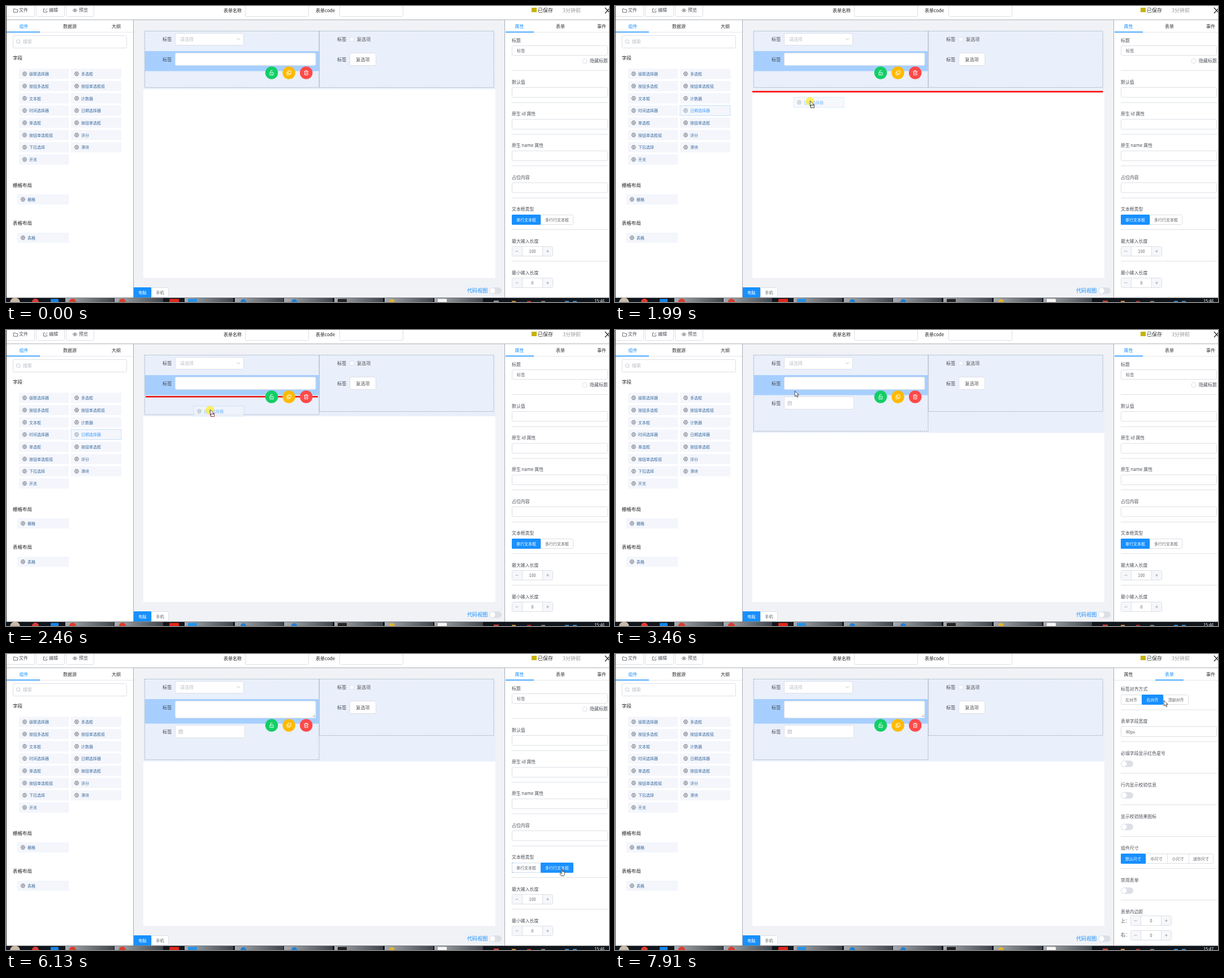
These frames come from a looping animation (1067x525 px, 7.99 s). An HTML page:

```html
<!DOCTYPE html>
<html lang="zh-CN">
<head>
<meta charset="utf-8">
<title>表单设计器</title>
<style>
html, body { margin: 0; width: 100%; height: 100%; overflow: hidden; background: #fff; }
svg { display: block; width: 1067px; height: 525px; }
text { font-family: "Noto Sans CJK SC", "Noto Sans", sans-serif; white-space: pre; }
</style>
</head>
<body>
<svg id="stage" viewBox="0 0 1067 525" xmlns="http://www.w3.org/2000/svg"></svg>
<script>
const LOOP = 7990;
const BLUE = '#1890ff', EDGE = '#dcdfe6', INK = '#4c5058', SOFT = '#e9effb';

// Drawing helpers: every one returns SVG markup.
const rect = (x, y, w, h, fill, extra = '') =>
  `<rect x="${x}" y="${y}" width="${w}" height="${h}" fill="${fill}" ${extra}/>`;
const box = (x1, y1, x2, y2, fill = '#fff', stroke = EDGE, extra = '') =>
  rect(x1 + .5, y1 + .5, x2 - x1 - 1, y2 - y1 - 1, fill, `stroke="${stroke}" rx="2" ${extra}`);
const text = (x, cy, s, size = 7.9, fill = INK, extra = '') =>
  `<text x="${x}" y="${cy + size * .37}" font-size="${size}" fill="${fill}" ${extra}>${s}</text>`;
const mid = (x, cy, s, size, fill, extra = '') => text(x, cy, s, size, fill, 'text-anchor="middle" ' + extra);
const line = (d, stroke, w = 1, extra = '') =>
  `<path d="${d}" fill="none" stroke="${stroke}" stroke-width="${w}" ${extra}/>`;
const circle = (x, y, r, fill, extra = '') => `<circle cx="${x}" cy="${y}" r="${r}" fill="${fill}" ${extra}/>`;
const group = (id, body, extra = '') => `<g id="${id}" ${extra}>${body}</g>`;
const BOLD = 'font-weight="500"';

const hexIcon = (x, y, c = '#59606b') =>
  line(`M${x - 3.6} ${y}l1.8 -3.2h3.6l1.8 3.2l-1.8 3.2h-3.6z`, c, .9) + circle(x, y, 1.4, 'none', `stroke="${c}" stroke-width=".8"`);

const item = (x, cy, w, s, ink = '#3b6c9f', extra = '') =>
  rect(x, cy - 9, w, 18, '#f4f6fc', extra) + hexIcon(x + 10, cy, extra ? '#7c8da5' : undefined) + text(x + 18, cy + .3, s, 7, ink);

const hotItem = (x, cy) => item(x, cy, 89, '日期选择器', '#409eff', 'stroke="#9ccdf5" stroke-width=".8" stroke-dasharray="2 1"');

const divider = y => line(`M895 ${y}H1065`, '#dfe1e5');

function segments(edges, labels, active, y) {
  const h = 18, last = edges[edges.length - 1];
  return box(edges[0], y, last, y + h) + labels.map((s, i) => {
    const x = edges[i], w = edges[i + 1] - x, on = i === active;
    return (on ? rect(x, y, w, h, BLUE, 'rx="1.5"') : i ? line(`M${x + .5} ${y}v${h}`, EDGE) : '') +
      mid(x + w / 2, y + h / 2 + .2, s, 7, on ? '#fff' : '#606266');
  }).join('');
}

const stepper = (x, y, value) => box(x, y, x + 73, y + 18) +
  rect(x + 1, y + 1, 17, 16, '#f5f7fa') + rect(x + 55, y + 1, 17, 16, '#f5f7fa') +
  line(`M${x + 18.5} ${y}v18M${x + 54.5} ${y}v18`, EDGE) +
  line(`M${x + 6.5} ${y + 9}h5M${x + 61} ${y + 9}h5M${x + 63.5} ${y + 6.5}v5`, '#8c9099', .7) +
  mid(x + 36.5, y + 9, value, 7.2, '#606266');

const toggle = (x, cy) => rect(x, cy - 5.7, 22, 11.4, EDGE, 'rx="5.7"') + circle(x + 5.8, cy, 4.7, '#fff');

function topBar() {
  const button = (x1, x2, s) => box(x1, -6, x2, 19) + text(x1 + 23, 7.5, s, 8, INK);
  return rect(0, 0, 1067, 24, '#fff') +
    button(0, 51, '文件') + button(53, 104, '编辑') + button(106, 156, '预览') +
    line('M13.5 5h2.5l1 1.2h3.5v5h-7z', INK, .8) +
    line('M69 5h-2.5v6h6V8.5M69.500 8.500l3.500 -4', INK, .8) +
    line('M118 7.700q4 -5.200 8 0q-4 5.200 -8 0z', INK, .8) + circle(122, 7.7, 1.2, INK) +
    text(385, 7.8, '表单名称', 8, '#222', BOLD) + box(423, -6, 536, 19) +
    text(548, 7.8, '表单code', 8, '#222', BOLD) + box(590, -6, 703, 19) +
    rect(930, 3, 9, 8, '#c6b30b') + text(941, 7.5, '已保存', 9, '#333', BOLD) +
    text(985, 7.5, '3分钟前', 9, '#999') +
    line('M1060 3l9 10M1060 13l9 -10', '#222', 1.2) + line('M0 24.5H1067', '#aeb2ba');
}

function leftPanel() {
  const columns = [
    ['级联选择器', '按钮多选框', '文本框', '时间选择器', '单选框', '按钮单选框组', '下拉选择', '开关'],
    ['多选框', '按钮单选框组', '计数器', '日期选择器', '按钮单选框', '评分', '滑块']];
  const heading = (cy, s) => text(12, cy, s, 8.5, '#222', BOLD);
  return rect(0, 25, 225, 493, '#fff') + line('M225.5 25V518', '#a9adb5') +
    mid(31.5, 36, '组件', 8, BLUE) + mid(113, 36, '数据源', 8, '#333') + mid(195, 36, '大纲', 8, '#333') +
    line('M0 46.500H225', '#e4e7ed') + rect(1, 45.5, 59, 1.5, BLUE) +
    box(12, 52, 214, 75) + circle(21.5, 63, 3.2, 'none', 'stroke="#b8bcc4" stroke-width=".8"') +
    line('M24 65.500l2 2', '#b8bcc4', .8) + text(30, 63.5, '搜索', 8, '#b8bcc4') +
    heading(92, '字段') +
    columns.map((names, c) => names.map((s, i) => item(c ? 115 : 23, 120.3 + 21.7 * i, c ? 89 : 88, s)).join('')).join('') +
    heading(317.5, '栅格布局') + item(20, 343, 91, '栅格') +
    heading(385, '表格布局') + item(20, 411, 91, '表格');
}

function canvasArea() {
  const dash = 'fill="none" stroke="#9aa7b8" stroke-width=".9" stroke-dasharray="2 1.4"';
  const label = (x, cy) => text(x, cy, '标签', 8.2, '#44484f');
  const tool = (x, fill, icon) => circle(x, 118.5, 11.2, fill) + `<g transform="translate(${x} 118.5)">${line(icon, '#fff', .9)}</g>`;
  return rect(226, 25, 656, 493, '#f0f2f6') + rect(243, 146, 623, 336.5, '#fff') +
    rect(243, 44, 623, 103, SOFT, 'id="row"') +
    rect(246, 80, 307.5, 35.5, '#a6cfff', 'id="selected"') +
    rect(245.5, 44.5, 308.5, 100, 'none', 'id="cell" ' + dash) + rect(554.5, 44.5, 308.5, 100, 'none', dash) +
    label(277, 59) + box(299, 48, 421, 70) + text(308, 59.3, '请选择', 8, '#bcc0c8') + line('M408.500 57.500l2.700 2.700l2.700 -2.700', '#b4b8c0', .9) +
    label(277, 94.5) + rect(299.5, 83.5, 248.5, 22, '#fff', 'id="input" rx="2" stroke="#dcdfe6"') +
    rect(308, 89.5, 1, 10, '#333', 'id="caret"') +
    group('grip', line('M542.500 112l4.500 -4.500M545 112l2 -2', '#888', .8)) +
    label(586, 59) + box(608, 55, 616, 63) + text(621, 59, '复选项', 8.1, '#555') +
    label(586, 94.5) + box(608, 83, 655, 106) + mid(631.5, 94.8, '复选项', 8.1, '#555') +
    group('date', label(277, 130) + box(299, 118, 423, 141) +
      line('M306 127h6.500v6h-6.500zM306 129h6.500M308 126v1.500M310.500 126v1.500M307.500 131h3.500', '#b4b8c0', .8)) +
    rect(247, 117, 305, 2.6, '#e81515', 'id="cellDrop"') + rect(243, 150.6, 620.5, 2.7, '#fb0808', 'id="pageDrop"') +
    group('tools',
      tool(470, '#13ce66', 'M-3 -.5h6v4.500h-6zM-1.800 -.5v-2a1.800 1.800 0 0 1 3.500 -.6M0 1v1.500') +
      tool(500.6, '#ffba00', 'M-1.500 -3.500h5v5h-5zM-1.500 -1.500h-2v5h5v-2') +
      tool(531.2, '#ff4949', 'M-4 -2.500h8M-1.300 -2.500v-1.400h2.600v1.400M-2.800 -2.500v6.300h5.600v-6.300M-.9 -.5v2.500M.9 -.5v2.500')) +
    rect(226, 499, 31, 18, BLUE) + mid(241.5, 508, '电脑', 7.2, '#fff') +
    box(257, 499, 288, 517) + mid(272.5, 508, '手机', 7.2, '#606266') +
    text(816, 504.5, '代码视图', 9.1, BLUE) + toggle(855, 505);
}

function propertyPanel() {
  const rows = [[135, '默认值'], [191.5, '原生 id 属性'], [247.5, '原生 name 属性'], [304, '占位内容']];
  const edges = [895, 946, 1004], types = ['单行文本框', '多行行文本框'];
  return text(895, 61.3, '标题') + box(895, 70, 1065, 88) + text(904, 79.3, '标签', 7.2, '#606266') +
    box(1020, 93, 1028, 102) + text(1033, 97.5, '隐藏标题', 8) + divider(114.5) +
    rows.map(([cy, s]) => text(895, cy, s) + box(895, cy + 9, 1065, cy + 27.5) + divider(Math.round(cy + 35.5) + .5)).join('') +
    text(895, 360, '文本框类型') + segments(edges, types, 0, 370) +
    group('multi', segments(edges, types, 1, 370)) + divider(396.5) +
    text(895, 417, '最大输入长度') + stepper(895, 426, 100) + divider(452.5) +
    text(895, 473, '最小输入长度') + stepper(895, 482, 0);
}

function formPanel() {
  const switches = [[176, '必填字段显示红色星号'], [232, '行内显示校验信息'], [288, '显示校验结果图标'], [401, '禁用表单']];
  return text(895, 62, '标签对齐方式') + segments([895, 932, 970, 1015], ['左对齐', '右对齐', '顶部对齐'], 1, 72) + divider(99) +
    text(895, 119.5, '表单字段宽度') + box(895, 128, 1065, 147) + text(904, 137.8, '80px', 7.3, '#606266') + divider(155.5) +
    switches.map(([cy, s]) => text(895, cy, s) + toggle(895, cy + 18.7) + divider(Math.round(cy + 35) + .5)).join('') +
    text(895, 344, '组件尺寸') + segments([895, 939, 977, 1015, 1059], ['默认尺寸', '中尺寸', '小尺寸', '迷你尺寸'], 0, 354) + divider(380.5) +
    text(895, 457, '表单内边距') + text(895, 473, '上：') + stepper(912, 464, 0) +
    text(895, 498.5, '右：') + stepper(912, 490, 0);
}

function rightPanel() {
  return rect(883, 25, 184, 493, '#fff') + line('M882.5 25V518', '#a9adb5') +
    mid(908.5, 36, '属性', 8, BLUE, 'id="tabProps"') + mid(981, 36, '表单', 8, '#333', 'id="tabForm"') + mid(1054, 36, '事件', 8, '#333') +
    line('M883 46.500H1067', '#e4e7ed') + rect(884, 45.5, 50, 1.5, BLUE, 'id="underline"') +
    group('props', propertyPanel()) + group('form', formPanel());
}

function taskbar() {
  const windows = [105, 192, 316, 405, 492, 581, 670, 758];
  const squares = [[79, 14, '#1684e8'], [289, 17, '#e3261c'], [322, 16, '#2492e8'], [587, 16, '#222'], [764, 16, '#f6f6f6']];
  const rounds = [[16, 9, '#c9b9a8'], [52, 6, '#e03a32'], [118, 6, '#dd3b2c'], [206, 6, '#dd3b2c'], [420, 5, '#1f7fd6'], [510, 5, '#1f7fd6'], [683, 5, '#e5b52c']];
  const tray = [[898, '#d28a32'], [925, '#b52a24'], [950, '#777'], [992, '#2f83c8'], [1006, '#2f83c8']];
  return rect(0, 517.5, 1067, 8, '#10151b') +
    windows.map(x => rect(x, 518, 86, 7, 'url(#glass)')).join('') +
    squares.map(([x, w, c]) => rect(x, 519.5, w, 6, c, 'rx="1"')).join('') +
    rounds.map(([x, r, c]) => circle(x, 526 - (r < 7 ? 1 : 0), r, c)).join('') +
    tray.map(([x, c]) => rect(x - 3, 523, 7, 2, c)).join('') +
    rect(863, 522.5, 9, 3, '#999', 'id="trayIcon"') +
    text(1041, 523.5, '15:46', 7.4, '#fff', 'id="clock"');
}

function inputBar() {
  const c = '#2d78c8';
  return box(984, 504, 1070, 517, '#fff', '#c4d4e6') + circle(989.5, 510.5, 4.6, '#ef6c1c') + text(996, 510.7, '英', 9, c, BOLD) +
    `<path d="M1013 506.500a4 4 0 1 0 2.500 6a4 4 0 0 1 -2.500 -6z" fill="${c}"/>` + text(1021, 510, '·,', 8, c) +
    line('M1030.500 507.500h8.500v6h-8.500zM1032 509.500h5.500M1032 511.500h5.500', c, .9) +
    circle(1046, 508, 1.8, '#a8c5e4') + rect(1043.5, 510.5, 5, 4, '#a8c5e4', 'rx="1.5"') +
    `<path d="M1053 507l2 -1h4l2 1l1 2.500l-2 .5v4.500h-6v-4.500l-2 -.5z" fill="${c}"/>` + line('M1065 514l4 -7', c, 1.5);
}

const pointers =
  group('arrow', '<path d="M.3 .3v9.700l2.300 -2.100l1.700 3.600l1.600 -.7l-1.600 -3.500h3z" fill="#fff" stroke="#222" stroke-width=".8"/>') +
  group('beam', line('M-1.500 -5h3M0 -5v10M-1.500 5h3', '#222', .9)) +
  group('move', line('M-6 0h12M0 -6v12M-4 -2l-2 2l2 2M4 -2l2 2l-2 2M-2 -4l2 -2l2 2M-2 4l2 2l2 -2', '#222', .9)) +
  group('hand', '<path d="M0 0q1.200 -1 1.500 .5v3.500l4 1v4l-1.500 3h-4.500l-2.500 -4l1 -1l2 1.500z" fill="#fff" stroke="#222" stroke-width=".8"/>') +
  group('drop', rect(1.5, 8, 6, 4.5, '#fff', 'id="dropMark" stroke="#333" stroke-width=".9"'));

document.getElementById('stage').innerHTML =
  '<defs><linearGradient id="glass"><stop stop-color="#a9adb1"/><stop offset="1" stop-color="#3f454b"/></linearGradient></defs>' +
  canvasArea() + leftPanel() + rightPanel() + topBar() + taskbar() + rect(0, 0, 1, 518, '#333') +
  group('hot', hotItem(115, 185.4)) + group('ghost', hotItem(0, 9), 'opacity=".68"') +
  group('ime', inputBar()) + group('pointer', circle(0, 1, 7.5, '#ffed2e', 'id="glow" opacity=".75"') + pointers);

const el = {};
document.querySelectorAll('[id]').forEach(n => el[n.id] = n);
const show = (id, on) => el[id].setAttribute('display', on ? 'inline' : 'none');
const set = (id, name, value) => el[id].setAttribute(name, value);
const place = (id, x, y) => set(id, 'transform', `translate(${x} ${y})`);
const ramp = (t, from, length) => {
  const p = Math.min(1, Math.max(0, (t - from) / length));
  return p * p * (3 - 2 * p);
};

// Pointer stops: time, x, y
const route = [
  [130, 944, 508], [890, 202, 206], [960, 199, 204], [1350, 144, 183], [1670, 144, 183],
  [1990, 345, 168], [2460, 361, 141], [2980, 361, 141], [3460, 318, 108], [3620, 316, 97],
  [4200, 316, 97], [5030, 962, 212], [5100, 974, 242], [5800, 983, 382], [6130, 983, 382],
  [6670, 976, 107], [6810, 971, 60], [6970, 971, 52], [7130, 979, 37], [7330, 979, 37],
  [7740, 988, 73], [7820, 980, 77], [7910, 971, 82], [LOOP, 971, 82]];

function pointerAt(t) {
  const i = Math.max(1, route.findIndex(stop => stop[0] > t));
  const [t0, x0, y0] = route[i - 1], [t1, x1, y1] = route[i];
  const p = Math.max(0, (t - t0) / (t1 - t0));
  return [x0 + (x1 - x0) * p, y0 + (y1 - y0) * p];
}

const DRAG = 1670, DROP = 2910, OVER_PAGE = 1870, OVER_CELL = 2230, FOCUS = 3800, IME = 3870, SWITCH = 5900, TAB = 7180;

function render(t) {
  const [x, y] = pointerAt(t);
  const within = (a, b) => t >= a && t < b;
  const dragging = within(DRAG, DROP), overCell = within(OVER_CELL, DROP);
  const dropped = t >= DROP, multi = t >= SWITCH, grow = multi ? 8 : 0;

  set('row', 'height', (dropped ? 138.5 : overCell ? 109 : t >= OVER_PAGE ? 106 : 103.5) + grow);
  set('cell', 'height', (dropped ? 135 : overCell ? 105.5 : 100) + grow);
  set('selected', 'height', 35.5 + grow);
  set('input', 'height', 22 + grow);
  set('input', 'stroke', within(FOCUS, SWITCH) ? '#3f8fdc' : EDGE);
  show('caret', within(FOCUS, SWITCH) && (t - FOCUS + 200) % 1060 < 530 || within(5090, 5200));
  show('grip', multi);
  show('date', dropped);
  place('date', 0, grow);
  place('tools', 0, grow);
  show('pageDrop', within(OVER_PAGE, OVER_CELL));
  show('cellDrop', overCell);

  set('multi', 'opacity', ramp(t, SWITCH, 250));
  const formTab = t >= TAB;
  show('props', !formTab);
  show('form', formTab);
  set('tabProps', 'fill', formTab ? '#333' : BLUE);
  set('tabForm', 'fill', formTab ? BLUE : '#333');
  set('underline', 'x', 884 + 72 * ramp(t, TAB, 300));
  el.clock.textContent = formTab ? '15:47' : '15:46';
  set('trayIcon', 'fill', t < DRAG ? '#999' : '#c9423a');
  show('ime', within(IME, SWITCH + 70));

  const onItem = within(1150, DRAG);
  show('hot', within(1150, DROP));
  show('ghost', dragging);
  place('ghost', x - 29, y - 6);
  show('pointer', t >= 130);
  place('pointer', x, y);
  const beam = within(3560, 4290), hand = within(5780, 6160) || within(7090, 7400);
  show('move', onItem);
  show('beam', beam);
  show('hand', hand);
  show('arrow', !onItem && !beam && !hand);
  show('drop', dragging);
  set('dropMark', 'stroke', overCell ? '#8b2630' : '#333');
  show('glow', dragging || within(FOCUS, FOCUS + 90) || within(SWITCH, SWITCH + 90) || within(TAB - 40, TAB + 50));
}

const start = performance.now();
function frame() {
  render((performance.now() - start) % LOOP);
  requestAnimationFrame(frame);
}
frame();
</script>
</body>
</html>
```
